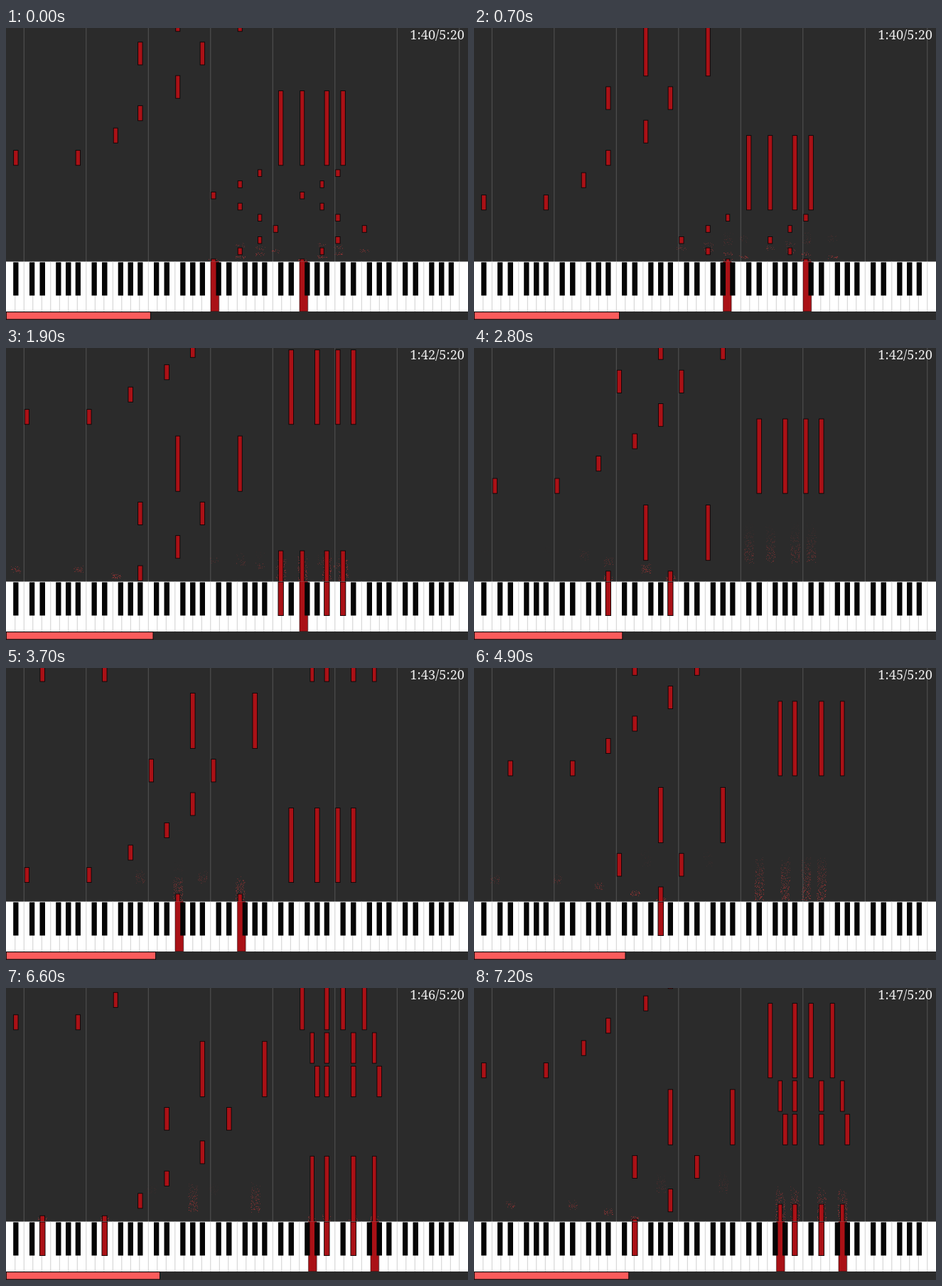
Recreate the animation shown at these times as an HTML page with a canvas. Size 650 px wide and 412 px high, loop 7.3 s.

```html
<!DOCTYPE html>
<html lang="en">
<head>
<meta charset="utf-8">
<title>Falling notes</title>
<style>
  html, body { margin: 0; width: 650px; height: 412px; overflow: hidden; background: #2b2b2b; }
  canvas { position: absolute; left: 0; top: 0; }
  #clock {
    position: absolute; right: 5px; top: -2px;
    font: 18.2px/22px "Noto Serif", serif; color: #eee; white-space: pre;
  }
</style>
</head>
<body>
<canvas id="stage" width="650" height="412"></canvas>
<div id="clock"></div>
<script>
const g = document.getElementById('stage').getContext('2d');
const clock = document.getElementById('clock');

const LOOP = 7300, STEP = 100;
const KEY_Y = 329.6, KEY_END = 400, KEY_W = 12.5, OCTAVE = 87.5;
const SONG = 320, START = 100.33, SPEED = 111;
const BEAT = 15.75;
const RED = '#aa1116';

// time in ms, scroll distance in px
const SCROLL = [[0, 0], [700, 63], [1900, 197.5], [3700, 392.3], [4900, 525.3], [6000, 647.8], [7200, 783.5]];

// visible strip of each key, measured from its C
const STRIP = {
  C: [0.8, 8], 'C#': [8, 15.3], D: [15.3, 22.5], 'D#': [22.5, 30], E: [30, 37.5], F: [38.3, 45.2],
  'F#': [45.2, 52.5], G: [52.5, 59], 'G#': [59, 66.5], A: [66.5, 72.7], 'A#': [72.7, 80], B: [80, 87.5]
};
const WHITES = 'CDEFGAB';

function makeKey(name) {
  const pitch = name.slice(0, -1);
  const c = 25 + (name.slice(-1) - 1) * OCTAVE;
  const [a, b] = STRIP[pitch];
  return {
    black: pitch.length > 1,
    x: c + a,
    w: b - a,
    white: c + WHITES.indexOf(pitch) * KEY_W
  };
}

const notes = [];
function add(names, bottom, h) {
  for (const name of names.split(' ')) notes.push({ key: makeKey(name), bottom, h });
}

// opening arpeggio in two hands
const ARP = ['A4 C6', 'F4 A5', 'C4 F5', 'F4 A5', 'A4 C6', 'C5 F6'];
for (let i = 0; i < 14; i++) add(ARP[i % 6], 210 + i * BEAT, 10.5);

// one bar: a held chord over a rising bass line
function bar(n, chord, bass) {
  const base = 194.2 - n * 18 * BEAT;
  add(chord, base, 106);
  for (const [names, beat, h] of bass) add(names, base - beat * BEAT, h);
}
const line = (root, fifth, octave, top, pair, last) => [
  [root, 0, 22], [fifth, 2, 22], [octave, 4, 22], [top, 6, 33], [pair, 9, 33], [last, 12, 79]
];
bar(0, 'C#5 F5 A#5 C#6', line('A#0 A#1', 'F2', 'A#2', 'F3', 'A#2 A#3', 'F3 F4'));
bar(1, 'D#5 G#5 C6 D#6', line('C1 C2', 'G#2', 'D#3', 'G#3', 'C3 C4', 'G#3 G#4'));
bar(2, 'G5 A#5 D#6 G6', [
  ...line('D#1 D#2', 'A#2', 'D#3', 'A#3', 'D#3 D#4', 'A#3 A#4'),
  ['G#5 A#5 D#6 G#6', 12, 44], ['G5 A#5 D#6 G6', 15, 44]
]);
bar(3, 'F5 A#5 C#6 F6', [
  ['A#0 A#1', 0, 22], ['F2', 2, 22], ['A#2', 4, 22], ['F3', 6, 22], ['A#3', 8, 22]
]);

const blacks = [makeKey('A#0')];
for (let o = 1; o < 8; o++)
  for (const p of ['C#', 'D#', 'F#', 'G#', 'A#']) blacks.push(makeKey(p + o));

function scrollAt(t) {
  let i = 1;
  while (i < SCROLL.length - 1 && t > SCROLL[i][0]) i++;
  const [t0, y0] = SCROLL[i - 1], [t1, y1] = SCROLL[i];
  return y0 + (y1 - y0) * Math.min(1, (t - t0) / (t1 - t0));
}

function rand(n) {
  const v = Math.sin(n * 12.9898) * 43758.5453;
  return v - Math.floor(v);
}

function rect(color, x, y, w, h) {
  g.fillStyle = color;
  g.fillRect(x, y, w, h);
}

function framed(color, x, y, w, h) {
  rect('#0c0506', x, y, w, h);
  rect(color, x + 0.9, y + 0.9, w - 1.8, h - 1.8);
}

// sparks leave the key line while a note sounds, then rise and fade; long notes throw higher
function drawSparks({ key, bottom, h }, id, scroll) {
  const life = 145, density = 1.6;
  const past = bottom + scroll - KEY_Y;
  if (past < 0 || past - h > life) return;
  const mid = key.x + key.w / 2, speed = 0.25 + h * 0.0025;
  for (let j = 0; j < h * density; j++) {
    const age = past - j / density;
    if (age < 0 || age > life) continue;
    const seed = id * 531 + j * 3 + 1;
    const rise = age * speed * (0.85 + 0.3 * rand(seed));
    g.globalAlpha = 0.6 * (1 - age / life);
    rect('#c03838', Math.round(mid + (rand(seed + 1) - 0.5) * 13), Math.round(KEY_Y - 2 - rise), 1, 1);
  }
  g.globalAlpha = 1;
}

function drawNote({ key, bottom, h }, scroll) {
  const y = bottom - h + scroll;
  if (y + h > 0 && y < KEY_Y) framed(RED, key.x, y, key.w, h);
}

function drawKeys(scroll) {
  const sounds = n => n.bottom + scroll >= KEY_Y && n.bottom - n.h + scroll < KEY_Y - 1;
  const lit = notes.filter(sounds).map(n => n.key);
  const depth = KEY_END - KEY_Y;
  rect('#fff', 0, KEY_Y, 650, depth);
  for (let i = 1; i < 52; i++) rect('#d0d0d0', i * KEY_W - 0.2, KEY_Y, 1, depth);
  for (const k of lit) {
    if (k.black) continue;
    rect('#5a1013', k.white + 0.3, KEY_Y, 12, depth);
    rect(RED, k.white + 1.1, KEY_Y, 10.4, depth - 0.8);
  }
  for (const k of blacks) rect('#050505', k.x, KEY_Y + 0.9, k.w, 47);
  for (const k of lit) if (k.black) framed(RED, k.x - 0.5, KEY_Y, k.w + 1, 48.4);
}

function draw(t) {
  const scroll = scrollAt(t);
  const now = START + scroll / SPEED;

  rect('#2b2b2b', 0, 0, 650, 412);
  for (let x = 24.8; x < 650; x += OCTAVE) rect('#555', x, 0, 1, KEY_Y);

  g.save();
  g.beginPath();
  g.rect(0, 0, 650, 330);
  g.clip();
  notes.forEach((n, i) => drawSparks(n, i, scroll));
  notes.forEach(n => drawNote(n, scroll));
  g.restore();

  drawKeys(scroll);
  framed('#fb5c5c', 0, 400.3, now / SONG * 650, 11.2);

  const s = Math.floor(now);
  clock.textContent = `${Math.floor(s / 60)}:${String(s % 60).padStart(2, '0')}/5:20`;
}

const begin = performance.now();
function tick() {
  const t = Math.max(0, performance.now() - begin) % LOOP;
  draw(Math.floor(t / STEP) * STEP);
  requestAnimationFrame(tick);
}
tick();
</script>
</body>
</html>
```
